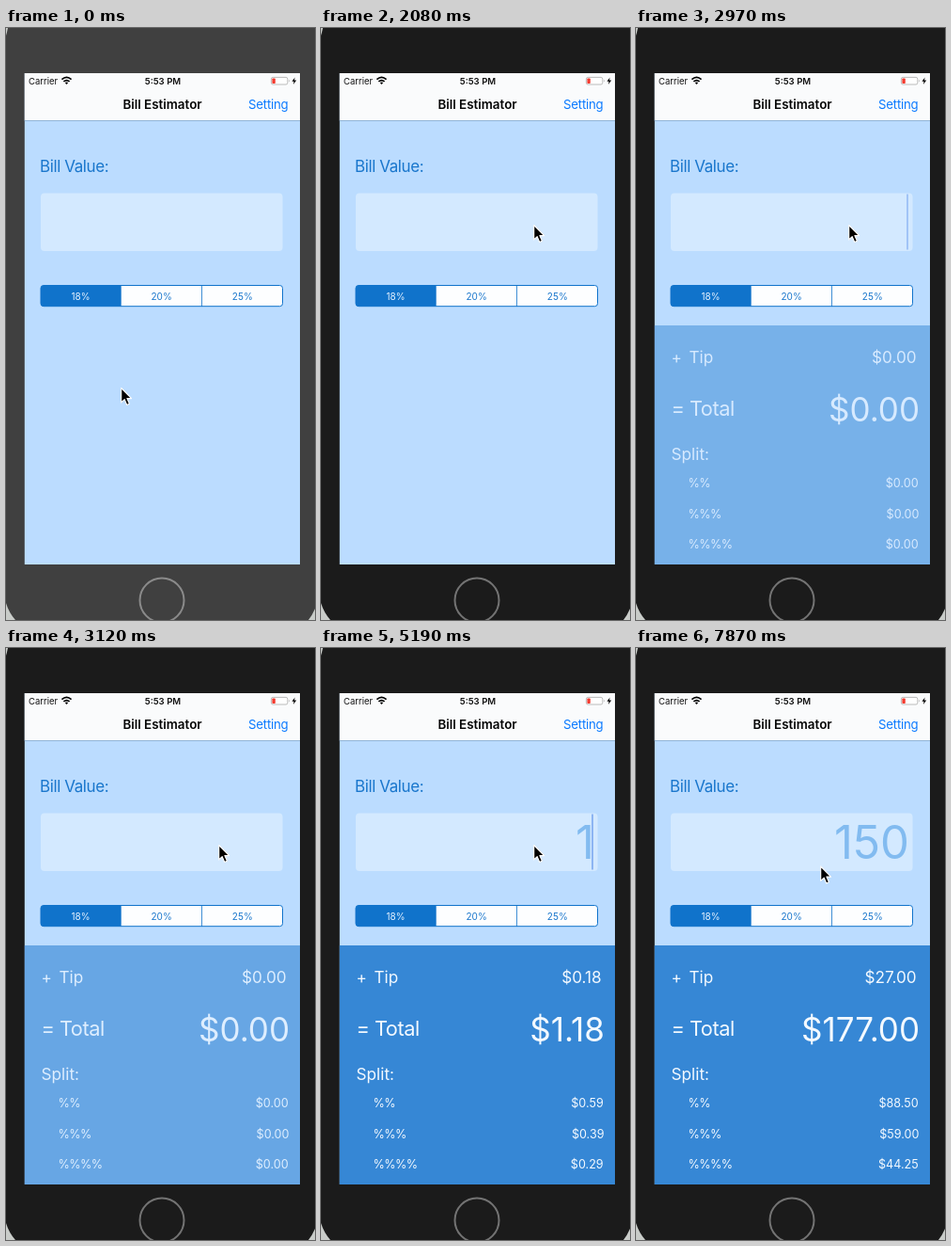
These frames come from a looping animation (329 by 629 pixels, 8 s). An HTML page:

```html
<!DOCTYPE html>
<html lang="en">
<head>
<meta charset="utf-8">
<title>Bill Estimator</title>
<style>
  html, body { margin: 0; width: 100%; height: 100%; overflow: hidden; background: #c9c9c9; }
  svg { display: block; width: 329px; height: 629px; }
  text { font-family: Inter, Roboto, "Liberation Sans", sans-serif; white-space: pre; }
  .end { text-anchor: end; }
  .mid { text-anchor: middle; }
  .status { font-size: 9.5px; fill: #111; }
  .time { font-size: 9.6px; font-weight: 600; }
  .title { font-size: 13.4px; font-weight: 600; fill: #050505; }
  .link { font-size: 13.2px; letter-spacing: -.2px; fill: #0a7aff; }
  .label { font-size: 17px; letter-spacing: -.4px; fill: #1976cc; }
  .seg { font-size: 10px; fill: #1976cc; }
  .seg.on { fill: #e8f3ff; }
  .bill { font-size: 49px; fill: #82bbf0; }
  #panel text { fill: #f3f9ff; }
  #panel .m { font-size: 17.2px; }
  #panel .l { font-size: 21.8px; letter-spacing: -.5px; }
  #panel .xl { font-size: 35px; }
  #panel .s { font-size: 12.6px; }
  #panel .p { letter-spacing: -.6px; }
</style>
</head>
<body>
<svg viewBox="0 0 329 629">
  <rect id="body" width="329" height="629"/>
  <path fill="#c9ccc9" d="M0 611Q3 621 10 629H0ZM329 617Q326 624 322 629H329ZM0 0H2Q1 5 0 8Z"/>
  <circle id="home" cx="166" cy="608" r="23.5" fill="none" stroke-width="2"/>

  <rect x="19.8" y="48" width="293.2" height="522" fill="#bbdcff"/>
  <rect x="19.8" y="48" width="293.2" height="50" fill="#fafbfc"/>
  <path d="M19.8 98.5H313" stroke="#91b5d8"/>

  <text class="status" x="24" y="59.5">Carrier</text>
  <path d="M59.4 54.6Q64.5 50 69.6 54.6M61.4 56.9Q64.5 54.2 67.6 56.9" fill="none" stroke="#000" stroke-width="1.7"/>
  <path d="M62.8 58.1Q64.5 56.8 66.2 58.1L64.5 60Z"/>
  <text class="status time mid" x="167" y="59.5">5:53 PM</text>
  <rect x="282.4" y="52.4" width="17.4" height="7.6" rx="1.8" fill="#fff" stroke="#aaa" stroke-width=".8"/>
  <path d="M301 54.8Q302.4 56.2 301 57.6Z" fill="#999"/>
  <rect x="283.4" y="53.4" width="3.4" height="5.6" rx=".8" fill="#f43b30"/>
  <path d="M307.6 52.4L304.5 56.7H306.6L305.9 60L309.2 55.5H307Z"/>

  <text class="title mid" x="166.5" y="85.6">Bill Estimator</text>
  <text class="link end" x="300.5" y="85.6">Setting</text>
  <text class="label" x="36" y="152.5">Bill Value:</text>

  <rect x="37" y="175.5" width="257.5" height="61.5" rx="4" fill="#d3e9ff"/>
  <text id="bill" class="bill end" x="291" y="224"></text>
  <path id="caret" d="M289 176.5V235.5" stroke="#6f9fee" stroke-width="1.4"/>

  <rect x="37" y="273.5" width="257.5" height="22.2" rx="3" fill="#fdfeff"/>
  <path d="M122.7 273.5H40a3 3 0 0 0-3 3v16.2a3 3 0 0 0 3 3H122.7Z" fill="#1073cb"/>
  <rect x="37" y="273.5" width="257.5" height="22.2" rx="3" fill="none" stroke="#1073cb"/>
  <path d="M208.5 274V296" stroke="#1073cb" stroke-width=".8"/>
  <text class="seg mid on" x="79.5" y="288.6">18%</text>
  <text class="seg mid" x="165.6" y="288.6">20%</text>
  <text class="seg mid" x="251.8" y="288.6">25%</text>

  <g id="panel">
    <rect x="19.8" y="316" width="293.2" height="254" fill="#3687d5"/>
    <text class="m" x="37.5" y="356">+</text>
    <text class="m" x="56.5" y="356">Tip</text>
    <text class="l" x="37.5" y="412">=</text>
    <text class="l" x="57" y="412">Total</text>
    <text class="m" x="37.5" y="459">Split:</text>
    <text class="s p" x="55.5" y="487.5">%%</text>
    <text class="s p" x="55.5" y="520.5">%%%</text>
    <text class="s p" x="55.5" y="552.5">%%%%</text>
    <text class="sum m end" x="298.7" y="356"></text>
    <text class="sum xl end" x="302" y="417.8"></text>
    <text class="sum s end" x="300.7" y="487.5"></text>
    <text class="sum s end" x="301.5" y="520.5"></text>
    <text class="sum s end" x="300.7" y="552.5"></text>
  </g>

  <path id="pointer" d="M0 0V15.4L3.5 12.1L6 18L8.7 16.8L6.2 11.1H10.9Z"
        stroke="#fff" stroke-width="1.1" stroke-linejoin="round"/>
</svg>
<script>
// The screen refreshes in even ticks; all times below are in ticks.
const LOOP = 8000, TICK = 148.5, LEAD = 10;
const ACTIVE = 14, FOCUS = 15.1, FADE = 16, FADE_LEN = 8;
const TYPED = "150", FIRST_KEY = 33.4, KEY_GAP = 3.5;
const REST = [122.7, 382.5], FIELD = [226.7, 209.5], EXIT = [196.7, 232];

const [body, home, bill, caret, panel, pointer] =
  ["body", "home", "bill", "caret", "panel", "pointer"].map(id => document.getElementById(id));
const sums = document.querySelectorAll(".sum");

const clamp = v => Math.min(1, Math.max(0, v));
const ramp = (n, from, length) => clamp((n - from) / length);
const smooth = p => p * p * (3 - 2 * p);
const mix = (a, b, p) => a + (b - a) * p;

function pointerAt(n) {
  const go = smooth(ramp(n, 0, 7));
  const leave = ramp(n, 51, 2);
  const lift = 22 * Math.sin(Math.PI * go);
  const x = mix(mix(REST[0], FIELD[0], go), EXIT[0], leave);
  const y = mix(mix(REST[1], FIELD[1], go) - lift, EXIT[1], leave);
  return `translate(${x} ${y})`;
}

// Solid just after focus or a key press, then a soft blink of six ticks.
function caretAt(n, lastInput) {
  const since = n - lastInput;
  if (since < 0) return 0;
  return since < 3 ? 1 : clamp(.5 + 2 * Math.sin(Math.PI * (since - 2) / 3));
}

function setText(node, text) {
  if (node.textContent !== text) node.textContent = text;
}

function draw(t) {
  const n = Math.floor((t + LEAD) / TICK);
  const keys = Math.min(TYPED.length, Math.max(0, Math.floor((n - FIRST_KEY) / KEY_GAP) + 1));
  const lastInput = keys ? FIRST_KEY + (keys - 1) * KEY_GAP : FOCUS;
  const entry = TYPED.slice(0, keys);
  const tip = entry * .18;
  const total = entry * 1.18;
  const active = n >= ACTIVE;

  body.setAttribute("fill", active ? "#1b1b1b" : "#404040");
  home.setAttribute("stroke", active ? "#737373" : "#8a8a8a");
  pointer.setAttribute("transform", pointerAt(n));
  caret.setAttribute("opacity", caretAt(n, lastInput));
  panel.setAttribute("opacity", ramp(n, FADE, FADE_LEN));
  setText(bill, entry);
  [tip, total, total / 2, total / 3, total / 4].forEach((sum, i) =>
    setText(sums[i], "$" + sum.toFixed(2)));
}

const start = performance.now();
function tick() {
  draw((performance.now() - start) % LOOP);
  requestAnimationFrame(tick);
}
tick();
</script>
</body>
</html>
```
